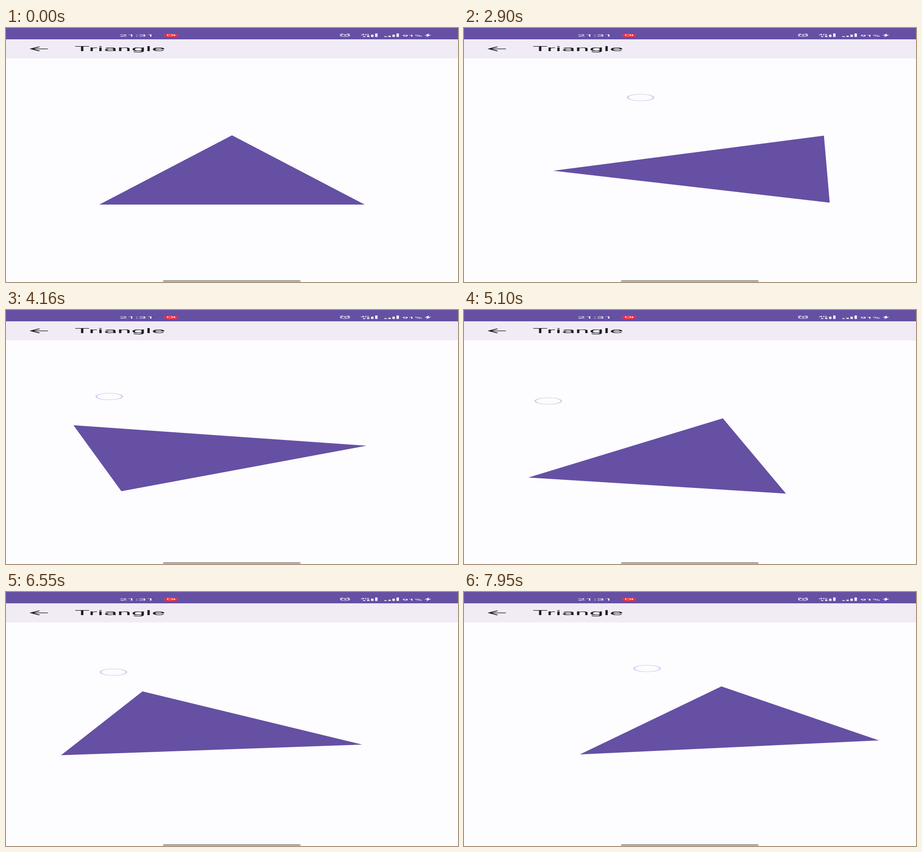
An HTML page with a canvas that plays this animation: 998 by 561 pixels, repeating every 8000 ms.

```html
<!DOCTYPE html>
<html lang="en">
<head>
<meta charset="utf-8">
<title>Triangle</title>
<style>
  html, body { margin: 0; width: 100%; height: 100%; overflow: hidden; background: #fdfcfe; }
  canvas { display: block; width: 100vw; height: 100vh; }
</style>
</head>
<body>
<canvas id="stage" width="998" height="561"></canvas>
<script>
const ctx = document.getElementById('stage').getContext('2d');

// A portrait phone screen squeezed into the landscape stage.
const PHONE = { w: 1080, h: 2400 };
const SX = 998 / PHONE.w, SY = 561 / PHONE.h;
const LOOP = 8000, TOUCH_START = 2290;
const PURPLE = '#6550a4', BAR = '#f1ebf5', PAGE = '#fdfcfe', INK = '#1c1b1f';

// One slow drag, out to the left and back: time, rotation in degrees, touch x and y on the stage.
const DRAG = [
  [TOUCH_START, 0, 466, 138],
  [2900, -91.1, 390, 153.5],
  [4160, -280.3, 228, 191],
  [5100, -346.1, 186, 201],
  [6550, -252.2, 237, 177],
  [7950, -126.5, 404, 169]
];

const slope = (i, c) => (DRAG[i + 1][c] - DRAG[i][c]) / (DRAG[i + 1][0] - DRAG[i][0]);

function tangent(i, c) {
  if (i === 0) return slope(0, c);
  if (i === DRAG.length - 1) return slope(i - 1, c);
  const before = DRAG[i][0] - DRAG[i - 1][0], after = DRAG[i + 1][0] - DRAG[i][0];
  return (slope(i - 1, c) * after + slope(i, c) * before) / (before + after);
}

// Cubic Hermite interpolation of column c.
function dragValue(t, c) {
  let i = 0;
  while (i < DRAG.length - 2 && t >= DRAG[i + 1][0]) i++;
  const span = DRAG[i + 1][0] - DRAG[i][0];
  const u = (t - DRAG[i][0]) / span, v = 1 - u;
  return v * v * (1 + 2 * u) * DRAG[i][c] + u * u * (3 - 2 * u) * DRAG[i + 1][c]
    + span * u * v * (v * tangent(i, c) - u * tangent(i + 1, c));
}

const backArrow = new Path2D('M20 11H7.83l5.59-5.59L12 4l-8 8 8 8 1.41-1.41L7.83 13H20z');

function rect(x, y, w, h, color) {
  ctx.fillStyle = color;
  ctx.fillRect(x, y, w, h);
}

function roundRect(x, y, w, h, r, color) {
  ctx.fillStyle = color;
  ctx.beginPath();
  ctx.roundRect(x, y, w, h, r);
  ctx.fill();
}

function polygon(points, color) {
  ctx.fillStyle = color;
  ctx.beginPath();
  points.forEach(([x, y]) => ctx.lineTo(x, y));
  ctx.closePath();
  ctx.fill();
}

function strokeLine(points, color, width) {
  ctx.strokeStyle = color;
  ctx.lineWidth = width;
  ctx.beginPath();
  points.forEach(([x, y]) => ctx.lineTo(x, y));
  ctx.stroke();
}

function ring(x, y, r, color, width) {
  ctx.strokeStyle = color;
  ctx.lineWidth = width;
  ctx.beginPath();
  ctx.arc(x, y, r, 0, Math.PI * 2);
  ctx.stroke();
}

function text(label, x, baseline, size, color, weight = 400) {
  ctx.font = `${weight} ${size}px Roboto, sans-serif`;
  ctx.fillStyle = color;
  ctx.fillText(label, x, baseline);
}

function signal(x) {
  [7, 11, 21, 32].forEach((h, i) => rect(x + i * 9.7, 84 - h, 5.6, h, '#fff'));
}

function drawStatusBar() {
  rect(0, 0, PHONE.w, 107, PURPLE);
  text('21:31', 271, 83, 33.5, '#fff');

  roundRect(378, 51, 33, 35, 14, '#f02f42');
  ctx.strokeStyle = '#fff';
  ctx.lineWidth = 1.8;
  ctx.strokeRect(386, 61, 11, 15);
  polygon([[398, 68], [404, 61], [404, 76]], '#fff');

  ring(810, 71, 10.5, '#fff', 3);
  strokeLine([[810, 64], [810, 72], [815, 74]], '#fff', 2.4);
  strokeLine([[798, 60], [805, 54]], '#fff', 3);
  strokeLine([[815, 54], [822, 60]], '#fff', 3);

  text('4G', 847, 69, 17, '#fff', 500);
  signal(853);
  signal(904);
  text('91%', 947, 82, 25.5, '#fff', 500);
  polygon([[1011, 51], [1000, 71], [1007, 71], [1004, 87], [1016, 65], [1009, 65]], '#fff');
}

function drawAppBar() {
  rect(0, 107, PHONE.w, 181, BAR);
  ctx.save();
  ctx.translate(45, 164);
  ctx.scale(2.75, 2.75);
  ctx.fillStyle = INK;
  ctx.fill(backArrow);
  ctx.restore();
  text('Triangle', 164, 220, 60.5, INK);
}

function drawTriangle(degrees) {
  ctx.save();
  ctx.translate(540, 1341);
  ctx.rotate(degrees * Math.PI / 180);
  polygon([[0, -327], [317, 327], [-317, 327]], PURPLE);
  ctx.restore();
}

function draw(t) {
  ctx.setTransform(SX, 0, 0, SY, 0, 0);
  rect(0, 0, PHONE.w, PHONE.h, PAGE);
  drawStatusBar();
  drawAppBar();

  const touching = t >= TOUCH_START;
  drawTriangle(touching ? dragValue(t, 1) : 0);
  if (touching) ring(dragValue(t, 2) / SX, dragValue(t, 3) / SY, 31, '#d3cdec', 4);

  roundRect(375, 2385, 329, 11, 5, '#85857a');
}

function tick() {
  draw(performance.now() % LOOP);
  requestAnimationFrame(tick);
}
tick();
</script>
</body>
</html>
```
